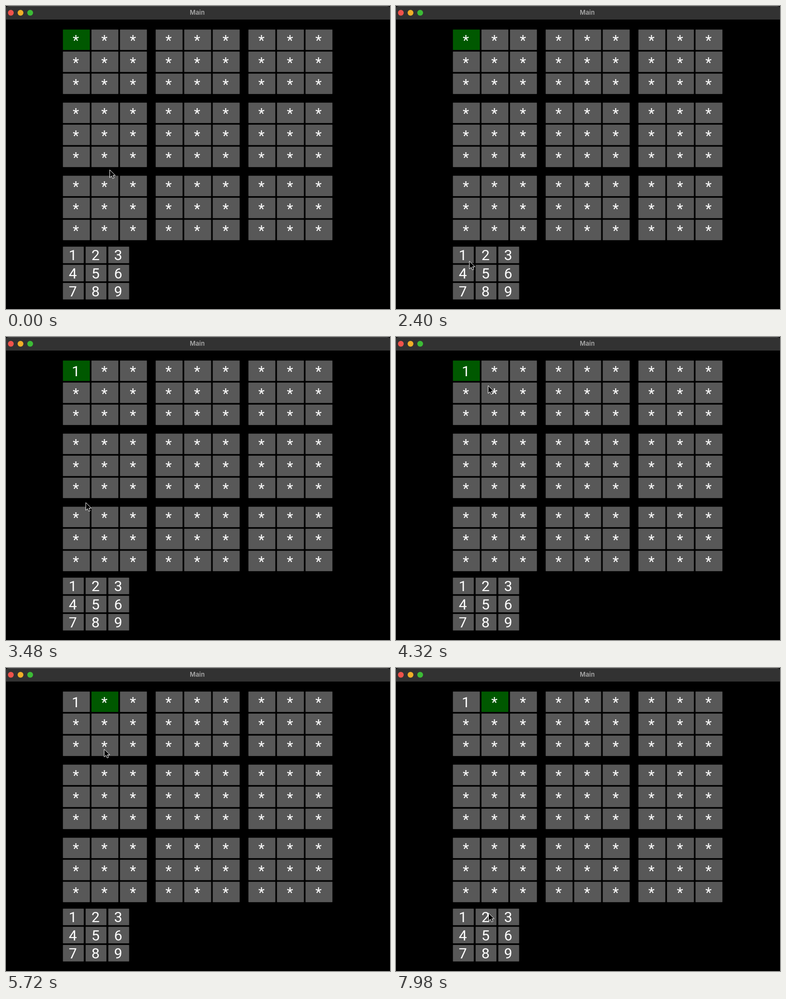
An HTML page that plays this animation: 794 px wide and 626 px high, repeating every 8000 ms.

```html
<!DOCTYPE html>
<html lang="en">
<head>
<meta charset="utf-8">
<title>Main</title>
<style>
  html, body { margin: 0; width: 100%; height: 100%; overflow: hidden; background: #000; }
  svg { display: block; width: 794px; height: 626px; }
  .label { font: 30px Roboto, sans-serif; fill: #fff; text-anchor: middle; }
  .title { font: 600 13px Inter, sans-serif; fill: #a8a8a8; text-anchor: middle; }
  .box { stroke: #000; stroke-opacity: .35; }
</style>
</head>
<body>
<svg id="stage" viewBox="0 0 794 626">
  <rect width="794" height="626" fill="#000"/>
  <path d="M0 28V5Q0 0 5 0H789Q794 0 794 5V28Z" fill="#323232"/>
  <path d="M5 .5H789" stroke="#4c4c4c"/>
  <circle cx="10" cy="14" r="6" fill="#ef524b"/>
  <circle cx="30" cy="14" r="6" fill="#f0ae28"/>
  <circle cx="50" cy="14" r="6" fill="#3cbc36"/>
  <text class="title" x="395.5" y="18">Main</text>
  <g id="buttons"></g>
  <path id="cursor" d="M.5 .5V16.5L4.2 13.1L6.7 18.5L9.5 17.3L7.1 12H12.1Z"
        fill="#000" stroke="#fff" stroke-linejoin="round"/>
</svg>
<script>
const LOOP = 8000;
const ENTER = 2600, PRESS = 5200, RELEASE = 5480;
const GRAY = '#585858', PRESSED_GRAY = '#505050';
const GREEN = '#005800', BRIGHT_GREEN = '#26a000';

// Stops of the pointer, eased in between
const STOPS = [
  { t: 0, x: 214, y: 338 },
  { t: 1380, x: 180, y: 530 },
  { t: 2780, x: 145, y: 526 },
  { t: 4320, x: 190, y: 100 },
  { t: 5320, x: 192, y: 77 },
  { t: 6460, x: 229, y: 395 },
  { t: 7980, x: 191, y: 506 }
];

const group = document.getElementById('buttons');
const cursor = document.getElementById('cursor');

function add(name, attrs) {
  const node = document.createElementNS('http://www.w3.org/2000/svg', name);
  for (const key in attrs) node.setAttribute(key, attrs[key]);
  return group.appendChild(node);
}

function button(x, y, w, h, baseline, label) {
  const box = add('rect', {
    class: 'box', x: x + .5, y: y + .5, width: w - 1, height: h - 1, rx: 1
  });
  const text = add('text', {
    class: 'label', x: x + w / 2 - 1, y: Math.round(y + baseline)
  });
  text.textContent = label;
  return { box, text };
}

const cells = Array.from({ length: 81 }, (_, i) => {
  const col = i % 9, row = Math.floor(i / 9);
  const x = 117 + 59 * (col % 3) + 191.8 * Math.floor(col / 3);
  const y = 48 + 45.5 * (row % 3) + 151 * Math.floor(row / 3);
  return button(x, y, 57, 43.5, 33, '*');
});
const keys = Array.from({ length: 9 }, (_, i) =>
  button(117 + 46.9 * (i % 3), 496.6 + 37.4 * Math.floor(i / 3), 44.5, 35.5, 28.8, i + 1));

function pointerAt(t) {
  const next = Math.max(1, STOPS.findIndex(stop => stop.t > t));
  if (t >= STOPS.at(-1).t) return STOPS.at(-1);
  const a = STOPS[next - 1], b = STOPS[next];
  const k = (t - a.t) / (b.t - a.t);
  const e = k * k * (3 - 2 * k);
  return { x: a.x + (b.x - a.x) * e, y: a.y + (b.y - a.y) * e };
}

function render(t) {
  const pressed = t >= PRESS && t < RELEASE;
  const selected = cells[t < PRESS ? 0 : 1];
  for (const { box } of [...cells, ...keys]) {
    box.setAttribute('fill', pressed ? PRESSED_GRAY : GRAY);
  }
  selected.box.setAttribute('fill', pressed ? BRIGHT_GREEN : GREEN);
  cells[0].text.textContent = t < ENTER ? '*' : '1';
  const { x, y } = pointerAt(t);
  cursor.setAttribute('transform', `translate(${x} ${y})`);
}

const start = performance.now();
function tick() {
  render((performance.now() - start) % LOOP);
  requestAnimationFrame(tick);
}
tick();
</script>
</body>
</html>
```
